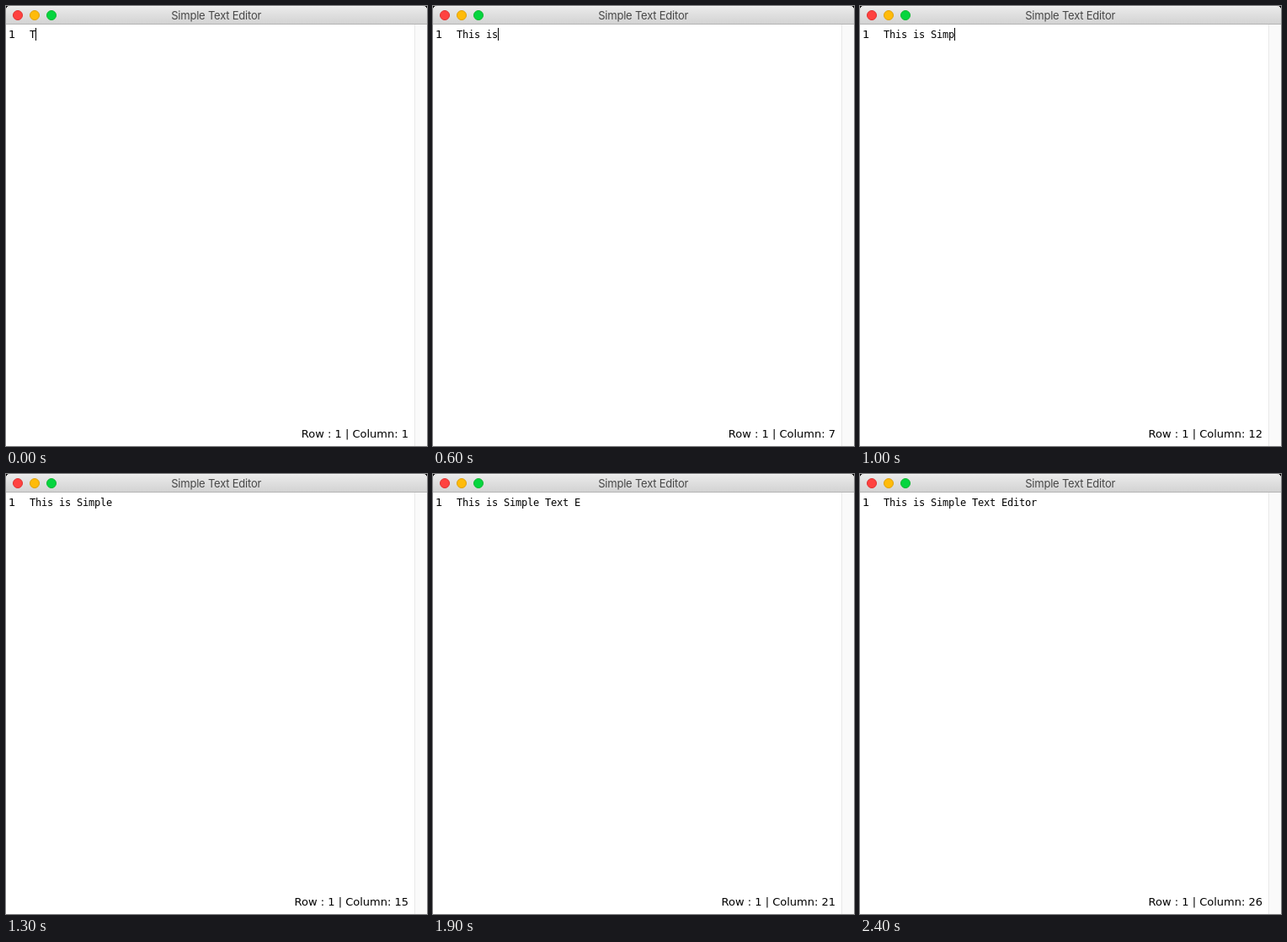
These frames come from a looping animation (500 by 522 pixels, 2.5 s). An HTML page:

```html
<!DOCTYPE html>
<html lang="en">
<head>
<meta charset="utf-8">
<title>Simple Text Editor</title>
<style>
  html, body { margin: 0; width: 100%; height: 100%; overflow: hidden; background: #000; }
  svg { display: block; }
  text { font: 13px "DejaVu Sans", Verdana, sans-serif; white-space: pre; }
  #title { font-family: Inter, sans-serif; letter-spacing: -.22px; fill: #474747; text-anchor: middle; }
  #typed { font: 12px "DejaVu Sans Mono", monospace; letter-spacing: -.224px; }
  #status { text-anchor: end; }
</style>
</head>
<body>
<svg width="500" height="522" viewBox="0 0 500 522">
  <defs>
    <linearGradient id="bar" x2="0" y2="1">
      <stop stop-color="#ebebeb"/>
      <stop offset="1" stop-color="#d3d3d3"/>
    </linearGradient>
  </defs>
  <path d="M0 522V5Q0 0 5 0H495Q500 0 500 5V522Z" fill="#fff"/>
  <path d="M0 21V5Q0 0 5 0H495Q500 0 500 5V21Z" fill="url(#bar)"/>
  <path d="M5 .5H495" stroke="#f5f5f5"/>
  <path d="M0 21.5H500" stroke="#b4b4b4"/>
  <g stroke-width="1">
    <circle cx="14" cy="11" r="5.5" fill="#ff4240" stroke="#e0302f"/>
    <circle cx="34" cy="11" r="5.5" fill="#ffbb0a" stroke="#e0a008"/>
    <circle cx="54" cy="11" r="5.5" fill="#05d53f" stroke="#0bb82f"/>
  </g>
  <text id="title" x="249.7" y="16">Simple Text Editor</text>
  <rect x="485" y="22" width="15" height="500" fill="#fafafa"/>
  <path d="M485.5 22V522" stroke="#e8e8e8"/>
  <text x="3" y="38">1</text>
  <text id="typed" x="28" y="38"></text>
  <rect id="caret" y="26" width="1" height="15"/>
  <text id="status" x="478" y="512"></text>
</svg>
<script>
  const MESSAGE = "This is Simple Text Editor";
  const STEP = 100, LOOP = 2500, CHAR_WIDTH = 7;
  const BLINK = 5.6, BLINK_PHASE = 1.8;
  const [typed, caret, status] = ["typed", "caret", "status"].map(id => document.getElementById(id));
  const start = performance.now();

  function draw() {
    const step = Math.floor((performance.now() - start) % LOOP / STEP);
    // two characters arrive together at the eighth step
    const column = step + (step < 7 ? 1 : 2);
    typed.textContent = MESSAGE.slice(0, column);
    status.textContent = `Row : 1 | Column: ${column}`;
    caret.setAttribute("x", 28 + CHAR_WIDTH * column);
    caret.style.opacity = (step + BLINK_PHASE) % BLINK < BLINK / 2 ? 1 : 0;
    requestAnimationFrame(draw);
  }
  draw();
</script>
</body>
</html>
```
